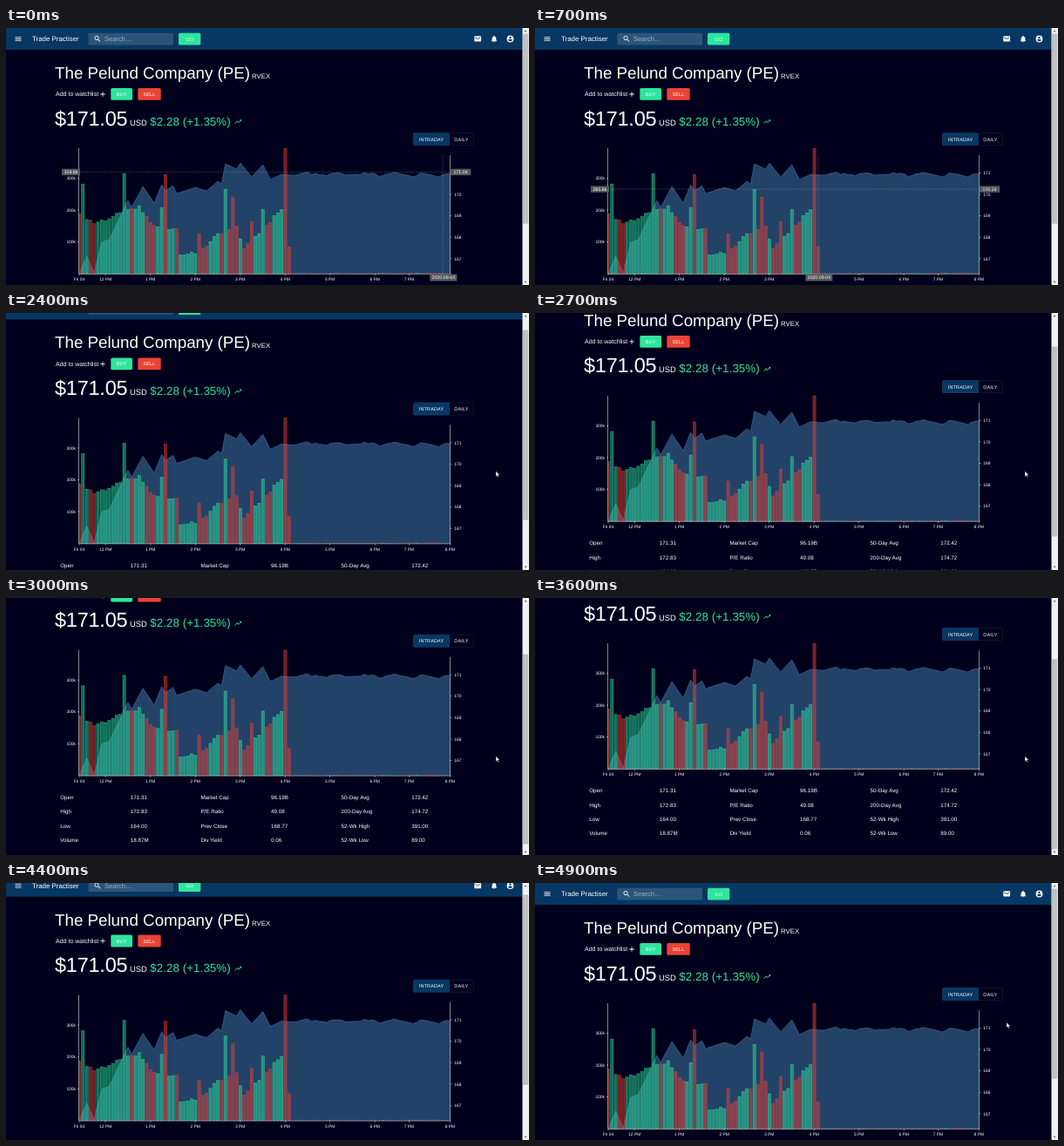
Write an HTML page that moves like this. It is 600x295 px and loops after 5000 ms.

```html
<!DOCTYPE html>
<html lang="en">
<head>
<meta charset="utf-8">
<title>Trading dashboard</title>
<style>
  html, body { margin: 0; width: 100%; height: 100%; overflow: hidden; background: #00001c; }
  svg { display: block; width: 100vw; height: 100vh; }
  text {
    font-family: "Liberation Sans", Arial, sans-serif; fill: #fff;
    white-space: pre; text-rendering: geometricPrecision;
  }
</style>
</head>
<body>
<svg viewBox="0 0 600 295" preserveAspectRatio="none">
  <rect width="600" height="295" fill="#00001c"/>
  <g id="page"></g>
  <g id="scrollbar"></g>
  <path id="pointer" d="M0 0V6.1L1.4 4.8 2.4 7 3.4 6.6 2.4 4.4H4.3Z" fill="#fff" stroke="#111" stroke-width=".4"/>
</svg>
<script>
const NS = "http://www.w3.org/2000/svg";
const $ = id => document.getElementById(id);
const page = $("page"), pointer = $("pointer");
const LOOP = 5000, STEP = 100, MAX_SCROLL = 86;
const LEFT = 84, RIGHT = 509.5, TOP = 138, BASE = 282.1, GAP = 4.3;
const OPEN_BARS = 57, ALL_BARS = 100;
const GREEN = "#2ee59d", RED = "#ea4335", NAVY = "#073763";

function add(parent, tag, attrs) {
  const el = document.createElementNS(NS, tag);
  for (const key in attrs) el.setAttribute(key, attrs[key]);
  parent.appendChild(el);
  return el;
}
const rect = (parent, x, y, width, height, fill, more) =>
  add(parent, "rect", { x, y, width, height, fill, ...more });
const line = (parent, x1, y1, x2, y2, stroke = "#d8dbe2", more) =>
  add(parent, "line", { x1, y1, x2, y2, stroke, "stroke-width": .6, ...more });
function label(parent, str, x, y, size, more) {
  const el = add(parent, "text", { x, y, "font-size": size, ...more });
  el.textContent = str;
  return el;
}
// 24-unit icon centred on a point
const icon = (d, x, y, fill = "#fff") =>
  add(page, "path", { d, fill, transform: `translate(${x - 4.69} ${y - 4.69}) scale(.3906)` });
const MID = { "text-anchor": "middle" };
const END = { "text-anchor": "end" };

// Linear interpolation between [position, value, ...] keys
function sample(keys, at) {
  const next = keys.findIndex(k => k[0] > at);
  const i = next < 0 ? keys.length - 1 : Math.max(1, next);
  const a = keys[i - 1], b = keys[i], p = (at - a[0]) / (b[0] - a[0]);
  return a.slice(1).map((v, n) => v + (b[n + 1] - v) * p);
}
// Repeatable noise in 0..1
function noise(i) {
  const v = Math.sin(i * 12.9898) * 43758.5453;
  return v - Math.floor(v);
}

function button(str, x, y, w, h, fill, more) {
  rect(page, x, y, w, h, fill, { rx: 1.5, ...more });
  label(page, str, x + w / 2, y + h / 2 + 2, 5.47, { ...MID, "letter-spacing": ".02857em" });
}

function drawNav() {
  rect(page, 0, 0, 600, 25, NAVY);
  icon("M3 18h18v-2H3v2zm0-5h18v-2H3v2zm0-7v2h18V6H3z", 14, 12.5);
  label(page, "Trade Practiser", 30, 15.3, 7.9);
  rect(page, 94.5, 5.8, 97.5, 13.6, "#fff", { rx: 1.5, "fill-opacity": .15 });
  icon("M15.5 14h-.8l-.3-.3A6.5 6.5 0 1 0 13.7 14.4l.3.3v.8l5 5 1.5-1.5zM9.5 14a4.5 4.5 0 1 1 0-9 4.5 4.5 0 0 1 0 9z", 105, 12.5);
  label(page, "Search…", 113, 15.2, 7.6, { "fill-opacity": .55 });
  button("GO", 198, 5.8, 25.3, 13.7, GREEN);
  icon("M20 4H4c-1.1 0-2 .9-2 2v12c0 1.1.9 2 2 2h16c1.1 0 2-.9 2-2V6c0-1.1-.9-2-2-2zm0 4l-8 5-8-5V6l8 5 8-5v2z", 541.2, 12.5);
  icon("M12 22c1.1 0 2-.9 2-2h-4c0 1.1.9 2 2 2zm6-6v-5c0-3-1.6-5.6-4.5-6.3V4a1.5 1.5 0 0 0-3 0v.7C7.6 5.4 6 7.9 6 11v5l-2 2v1h16v-1z", 560, 12.5);
  icon("M12 2a10 10 0 1 0 0 20 10 10 0 0 0 0-20zm0 3a3 3 0 1 1 0 6 3 3 0 0 1 0-6zm0 14.2a7.2 7.2 0 0 1-6-3.2c0-2 4-3.1 6-3.1s6 1.1 6 3.1a7.2 7.2 0 0 1-6 3.2z", 578.5, 12.5);
}

function drawHeader() {
  label(page, "The Pelund Company (PE)", 56, 58, 18.75);
  label(page, "RVEX", 282, 58, 7.81);
  label(page, "Add to watchlist", 57, 78.4, 7.03);
  icon("M19 13h-6v6h-2v-6H5v-2h6V5h2v6h6v2z", 111, 76);
  button("BUY", 120.3, 69, 24.7, 13.8, GREEN);
  button("SELL", 151.3, 69, 26.4, 13.8, RED);
  label(page, "$171.05", 56, 111.5, 23.44, { "letter-spacing": "-.00833em" });
  label(page, "USD", 142, 111.5, 9.38);
  label(page, "$2.28 (+1.35%)", 165.3, 111.5, 13.28, { "letter-spacing": ".00735em", style: "fill:" + GREEN });
  icon("M16 6l2.3 2.3-4.9 4.9-4-4L2 16.6 3.4 18l6-6 4 4 6.3-6.3L22 12V6z", 266.3, 107.5, GREEN);
  rect(page, 467.4, 120.6, 69, 14, "none", { rx: 1.5, stroke: "#1b2942", "stroke-width": .5 });
  button("INTRADAY", 467.4, 120.6, 41.3, 14, NAVY, { stroke: "#24507c", "stroke-width": .4 });
  button("DAILY", 508.7, 120.6, 27.5, 14, "none");
}

// Turning points of the price line: [bar, y]
const turns = [[0, 282], [2, 262], [4, 281], [6, 246], [8, 243], [13, 198], [14, 206], [17, 182],
  [20, 201], [22, 180], [23, 187], [25, 181], [26, 190], [31, 183], [34, 187], [37, 176],
  [38, 179], [39, 156], [42, 162], [43, 155], [46, 171], [49, 157], [51, 174], [54, 168], [57, 169]];
// Volume trend and the bars that stand out from it: [bar, height]
const trend = [[0, 71], [4, 58], [16, 76], [20, 54], [26, 52], [27, 24], [31, 22], [37, 44],
  [42, 55], [44, 28], [48, 48], [54, 74], [56, 31]];
const spikes = new Map([[1, 103], [12, 115], [22, 76], [23, 114], [32, 46], [39, 97], [41, 88], [46, 60], [49, 74], [55, 144]]);

const priceY = i => i < OPEN_BARS ? sample(turns, i)[0]
  : 168.3 + 1.5 * Math.sin(i * .8) + 3 * (noise(i) - .5);
const volume = i => i < OPEN_BARS ? spikes.get(i) ?? sample(trend, i)[0] + 5 * (noise(i) - .5)
  : .4 + .8 * noise(i);

function drawBar(i) {
  const height = volume(i), quiet = i >= OPEN_BARS;
  const x = Math.max(LEFT, LEFT + GAP * i - 1.6);
  // A bar is red when the price fell
  const color = i && priceY(i) < priceY(i - 1) ? GREEN : RED;
  rect(page, x, BASE - height, LEFT + GAP * i + 1.6 - x, height, color,
    { "fill-opacity": .47, stroke: quiet ? "none" : color, "stroke-opacity": .75, "stroke-width": .5 });
}

function drawChart() {
  const bars = [...Array(ALL_BARS).keys()];
  const curve = "M" + bars.map(i => `${LEFT + GAP * i} ${priceY(i).toFixed(2)}`).join("L");
  add(page, "path", { d: `${curve}V${BASE}H${LEFT}Z`, fill: "#234268" });
  add(page, "path", { d: curve, fill: "none", stroke: "#4677a5", "stroke-width": .6 });
  bars.forEach(drawBar);
  line(page, LEFT - .5, TOP, LEFT - .5, BASE);
  line(page, RIGHT, 146, RIGHT, BASE);
  line(page, LEFT, BASE + .3, RIGHT, BASE + .3);
  for (let k = 1; k <= 3; k++) {
    const y = BASE - 36.53 * k;
    line(page, LEFT - 2, y, LEFT, y);
    label(page, k + "00k", 80, y + 1.7, 4.9, END);
  }
  for (let k = 0; k < 5; k++) {
    const y = 166.4 + 24.6 * k;
    line(page, RIGHT, y, RIGHT + 2, y);
    label(page, 171 - k, 514.3, y + 1.7, 4.9);
  }
  const hourLabel = (str, x) => {
    line(page, x, BASE, x, BASE + 2);
    label(page, str, x, 290.2, 4.9, MID);
  };
  hourLabel("Fri 04", LEFT);
  for (let h = 0; h <= 6; h++) hourLabel(`${h || 12} PM`, 114.2 + 51.5 * h);
  hourLabel("7 PM", 462.5);
  hourLabel("8 PM", RIGHT);
}

function drawStats() {
  const rows = [
    ["Open", "171.31", "Market Cap", "96.19B", "50-Day Avg", "172.42"],
    ["High", "172.83", "P/E Ratio", "49.08", "200-Day Avg", "174.72"],
    ["Low", "164.00", "Prev Close", "168.77", "52-Wk High", "391.00"],
    ["Volume", "18.87M", "Div Yield", "0.06", "52-Wk Low", "89.00"]
  ];
  rows.forEach((row, r) => row.forEach((str, c) =>
    label(page, str, 62.2 + 80.6 * c, 309.2 + 16.4 * r, 6.25)));
}

drawNav();
drawHeader();
drawChart();
drawStats();

// Crosshair with value tags
const cross = add(page, "g", {});
const dash = { "stroke-dasharray": "1.6 1.2", "stroke-width": .4 };
const hLine = line(cross, LEFT, 0, RIGHT, 0, "#8b93a0", dash);
const vLine = line(cross, 0, 146, 0, BASE, "#8b93a0", dash);
function tag(width, height) {
  const g = add(cross, "g", {});
  rect(g, -width / 2, -height / 2, width, height, "#56585c");
  return { g, text: label(g, "", 0, 1.8, 5.2, MID) };
}
function place(t, x, y, str) {
  t.g.setAttribute("transform", `translate(${x} ${y})`);
  t.text.textContent = str;
}
const volTag = tag(21, 7.4), priceTag = tag(23.5, 7.4), dateTag = tag(31, 8);

const bar = $("scrollbar");
rect(bar, 592.5, 0, 7.5, 295, "#f1f1f1");
const thumb = rect(bar, 592.9, 0, 6.4, 218, "#c1c1c1");
add(bar, "path", { d: "M594.6 4.2l1.5-1.7 1.5 1.7zM594.6 290.8l1.5 1.7 1.5-1.7z", fill: "#505050" });

// Wheel notches: [start ms, scroll position reached]
const notches = [[2260, 39], [2640, 78.3], [3150, MAX_SCROLL], [3800, 47], [4134, 8], [4420, 0]];
const mousePath = [[0, 501, 165.35], [300, 410, 171], [700, 325, 185], [1000, 345, 188],
  [1400, 475.3, 180.55], [1900, 562, 181.6], [3900, 562, 181.6], [4900, 541, 160], [LOOP, 501, 165.35]];

function scrollAt(t) {
  return notches.reduce((pos, [start, goal]) => {
    const p = Math.min(1, Math.max(0, (t - start) / 300));
    return pos + (goal - pos) * p * p * (3 - 2 * p);
  }, 0);
}
const show = (el, on) => el.setAttribute("visibility", on ? "visible" : "hidden");

function render(t) {
  const scroll = scrollAt(t);
  const [x, y] = sample(mousePath, t);
  const hover = x < RIGHT;
  page.setAttribute("transform", `translate(0 ${-scroll})`);
  thumb.setAttribute("y", 6.6 + scroll * 63.7 / MAX_SCROLL);
  show(cross, hover);
  show(pointer, !hover && (t < 3900 || t >= 4900));
  pointer.setAttribute("transform", `translate(${x} ${y})`);
  hLine.setAttribute("y1", y);
  hLine.setAttribute("y2", y);
  vLine.setAttribute("x1", x);
  vLine.setAttribute("x2", x);
  place(volTag, 74.5, y, ((BASE - y) / .3653).toFixed(1) + "k");
  place(priceTag, 521.5, y, (171.04 - (y - 165.35) / 24.5).toFixed(2));
  place(dateTag, x + .8, 286.5, "2020-09-04");
}

const start = performance.now();
function tick() {
  const t = (performance.now() - start) % LOOP;
  render(Math.floor(t / STEP) * STEP);
  requestAnimationFrame(tick);
}
tick();
</script>
</body>
</html>
```
